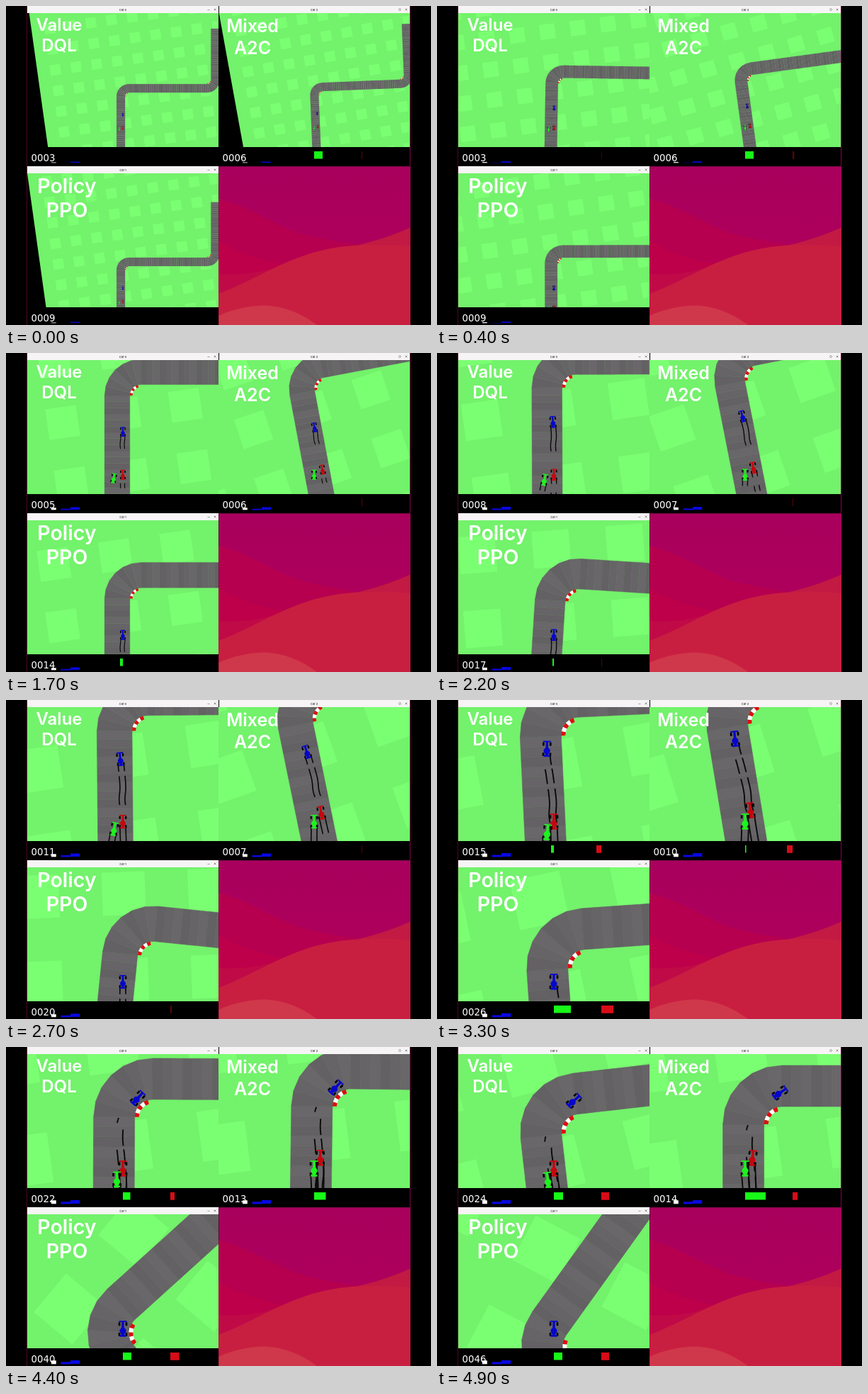
These frames come from a looping animation (600x450 px, 5 s). An HTML page:

```html
<!DOCTYPE html>
<html lang="en">
<head>
<meta charset="utf-8">
<title>Racing agents</title>
<style>
html, body { margin: 0; width: 100%; height: 100%; overflow: hidden; background: #000; }
svg { display: block; }
#stage { width: 600px; height: 450px; }
.label { font: 600 24px Inter, "Open Sans", sans-serif; fill: #fff; text-anchor: middle; }
.score { font: 13.3px "DejaVu Sans", sans-serif; fill: #fff; }
.title { font: 700 4px Inter, sans-serif; fill: #555; text-anchor: middle; }
.skid { fill: none; stroke: #0a0a0a; stroke-width: 1.9; }
</style>
</head>
<body>
<div id="root"></div>
<script>
const LOOP = 5000, STEP = 100;
const TIMES = [0, .9, 1.7, 2.7, 3.3, 3.9, 4.9];
const HALF = 29, TILE = 14.1;

// World positions on the track; turn is the rotation of the view that follows the car.
const CARS = {
  red: {
    color: '#c6060e',
    x: [14, 12, 13, 12.5, 13, 12.7, 12.7],
    y: [270, 253, 236, 204, 175, 151.5, 102],
    turn: [0, 1.6, 0, -.5, -2.7, 4.8, -6.5],
    skids: [[0, .6, 1.2], [0, 1.9, 5]]
  },
  green: {
    color: '#1cf41c',
    x: [-11, -10, -8, -2, 3, 5.5, 2.4],
    y: [277, 260, 244, 216, 189.5, 167, 117],
    turn: [-2.3, -13, -10.7, -11.6, -9.4, 0, 0],
    skids: [[0, 1.7, 5]]
  },
  blue: {
    color: '#0606cc',
    x: [14, 11.5, 13, 9.3, 8, 16.5, 51.3],
    y: [179, 159, 137.5, 101, 72, 46, 10],
    turn: [0, -.3, 0, 5.8, -4, -28.5, -54.3],
    skids: [[0, .5, 2.2], [0, 2.4, 2.9], [1, 3, 3.5], [-1, 3.65, 3.8]]
  }
};

const PANELS = [
  { car: 'red', title: 'Car 0', x: 30, y: 0, size: 24, words: [['Value', 75, 35], ['DQL', 75, 64]],
    score: [3, 2, 5, 11, 15, 19, 24], steer: [0, 0, 0, 0, -4, 8, 13], spin: [0, 1.5, 0, 0, -7, 1, 11] },
  { car: 'green', title: 'Car 2', x: 300, y: 0, size: 25, words: [['Mixed', 348, 36.5], ['A2C', 348, 67.5]],
    score: [6, 5, 6, 7, 10, 12, 14], steer: [12, 12, 0, 0, 1.5, 4, 29], spin: [1, 4, 1, 1, -8, -7, 7] },
  { car: 'blue', title: 'Car 1', x: 30, y: 226, size: 28.5, words: [['Policy', 86, 264], ['PPO', 86, 298]],
    score: [9, 8, 14, 20, 26, 33, 46], steer: [0, 0, -4, 0, 24, 12, 12], spin: [0, 0, 0, 2, 17, 14, 11] }
];
const SPEED_BAR = [.8, 1.8, 3, 4, 4.6, 5, 5];

const rad = a => a * Math.PI / 180;
const span = t => {
  let i = 0;
  while (i < TIMES.length - 2 && t > TIMES[i + 1]) i++;
  const h = TIMES[i + 1] - TIMES[i];
  return { i, h, u: Math.min(1, (t - TIMES[i]) / h) };
};

function linear(v, t) {
  const { i, u } = span(t);
  return v[i] + (v[i + 1] - v[i]) * u;
}

function smooth(v, t) {
  const { i, h, u } = span(t);
  const slope = k => {
    const a = Math.max(0, k - 1), b = Math.min(v.length - 1, k + 1);
    return (v[b] - v[a]) / (TIMES[b] - TIMES[a]);
  };
  const u2 = u * u, u3 = u2 * u;
  return (2 * u3 - 3 * u2 + 1) * v[i] + (u3 - 2 * u2 + u) * h * slope(i)
    + (3 * u2 - 2 * u3) * v[i + 1] + (u3 - u2) * h * slope(i + 1);
}

const pose = (car, t) => ({ x: smooth(car.x, t), y: smooth(car.y, t), turn: smooth(car.turn, t) });

const rect = (x, y, w, h, fill, extra = '') =>
  `<rect x="${x}" y="${y}" width="${w}" height="${h}" fill="${fill}" ${extra}/>`;
const poly = (points, fill, extra = '') =>
  `<polygon points="${points.map(p => p.map(n => n.toFixed(2)).join()).join(' ')}" fill="${fill}" ${extra}/>`;

function grass() {
  let d = '';
  for (let i = -2; i <= 9; i++)
    for (let j = -9; j <= 7; j++) d += `M${142 * i - 35.5} ${142 * j - 35.5}h71v71h-71z`;
  return `<g transform="translate(-125 116) rotate(-8)">${rect(-408, -1600, 3000, 3600, '#73f26b')}
    <path d="${d}" fill="#7bff72"/></g>`;
}

function track() {
  // Each leg: number of tiles and degrees turned per tile.
  const legs = [[42, 0], [6, 15], [38, 0], [6, -15], [25, 0]];
  const shades = ['#636163', '#666466', '#696769'];
  let x = 0, y = 54 + 42 * TILE, head = 0, n = 0, tiles = '', curbs = '';
  const side = (px, py, h, off) => [px + off * Math.cos(rad(h)), py + off * Math.sin(rad(h))];
  for (const [count, bend] of legs) {
    for (let k = 0; k < count; k++, n++) {
      const next = head + bend, mid = rad(head + bend / 2);
      const nx = x + TILE * Math.sin(mid), ny = y - TILE * Math.cos(mid);
      const strip = (a, b) => [side(x, y, head, a), side(x, y, head, b), side(nx, ny, next, b), side(nx, ny, next, a)];
      const shade = shades[n % 3];
      tiles += poly(strip(-HALF, HALF), shade, `stroke="${shade}" stroke-width=".6"`);
      if (bend && k < 5) {
        const s = Math.sign(bend);
        curbs += poly(strip(s * HALF, s * (HALF + 6)), k % 2 ? '#fff' : '#e00a14');
      }
      x = nx; y = ny; head = next;
    }
  }
  return tiles + curbs;
}

function carShape(color) {
  const wheels = [[-55, -80], [55, -80], [-55, 82], [55, 82]]
    .map(([x, y]) => rect(x - 15, y - 27, 30, 54, '#050505')).join('');
  return `<g transform="scale(.09)">${wheels}<path fill="${color}" d="M-60-130H60v20H18L20-20H25L50 10V40L20 90H50v30H-50V90H-20L-50 40V10L-25-20H-20L-18-110H-60z"/></g>`;
}

function world() {
  const names = Object.keys(CARS);
  const skids = names.map(n => `<path class="skid" id="skid-${n}"/>`).join('');
  const cars = ['red', 'green', 'blue'].map(n => `<g id="car-${n}">${carShape(CARS[n].color)}</g>`).join('');
  return `<g id="world">${grass()}${track()}${skids}${cars}</g>`;
}

function panel(p, k) {
  const { x, y } = p;
  const controls = k === 1
    ? `<circle cx="${x + 256}" cy="5" r="1.5" fill="none" stroke="#777" stroke-width=".6"/>`
    : `<path d="M${x + 254.5} ${y + 5.5}h3" stroke="#777" stroke-width=".7"/>`;
  return `${rect(x, y, 270, 226, '#000')}
    <svg x="${x}" y="${y + 10}" width="270" height="189" viewBox="${x} ${y + 10} 270 189" overflow="hidden">
      <use href="#world" id="view${k}"/></svg>
    ${rect(x + (k === 1 ? 1 : 0), y, k === 1 ? 269 : 270, 10, '#f6f4f5')}
    <text class="title" x="${x + 135}" y="${y + 6.6}">${p.title}</text>${controls}
    <path d="M${x + 263.7} ${y + 3.7}l2.6 2.6m0-2.6l-2.6 2.6" stroke="#666" stroke-width=".7"/>
    <text class="score" id="score${k}" x="${x + 5.5}" y="${y + 218.5}"></text>
    <path id="speed${k}" fill="#fff"/><path id="rear${k}" fill="#0808e0"/><path id="front${k}" fill="#0808e0"/>
    <path id="steer${k}" fill="#18f818"/><path id="spin${k}"/>
    ${p.words.map(([s, wx, wy]) => `<text class="label" style="font-size:${p.size}px" x="${wx}" y="${wy}">${s}</text>`).join('')}`;
}

function wallpaper() {
  return `<svg x="300.5" y="227" width="270.5" height="223" viewBox="300.5 227 270.5 223" overflow="hidden">
    <linearGradient id="dusk" x1="0" y1="0" x2="0" y2="1">
      <stop offset="0" stop-color="#a9005d"/><stop offset="1" stop-color="#b0005a"/></linearGradient>
    ${rect(300, 226, 272, 224, 'url(#dusk)')}
    <path d="M300 272C345 282 390 318 440 327Q470 333 497 337L470 450H300z" fill="#b6004f"/>
    <path d="M300 331Q330 352 392 364L370 450H300z" fill="#bd0049"/>
    <path d="M300 378Q350 381 388 366L370 450H300z" fill="#c00a47"/>
    <path d="M480 341Q530 331 572 312V450H480z" fill="#c21a43"/>
    <path d="M300 406C355 386 400 350 470 340Q520 334 572 339V450H300z" fill="#c81f41"/>
    <path d="M300 437Q330 423 366 422.500Q404 424 439 450H300z" fill="#cf384a"/></svg>`;
}

document.getElementById('root').innerHTML =
  `<svg id="stage" viewBox="0 0 600 450"><defs>${world()}</defs>${rect(0, 0, 600, 450, '#000')}
  ${wallpaper()}${PANELS.map(panel).join('')}
  ${rect(29, 0, 1, 450, '#4c0824')}${rect(570, 0, 1, 227, '#7a0845')}${rect(300, 226, 271, 1, '#7a0845')}</svg>`;

const el = id => document.getElementById(id);
const set = (id, name, value) => el(id).setAttribute(name, value);
const box = (x, y, w, h) => `M${x} ${y}h${w}v${h}h${-w}z`;

function skidPath(car, now) {
  let d = '';
  for (const [which, from, to] of car.skids) {
    const end = Math.min(to, now);
    if (end <= from) continue;
    for (const s of which ? [which] : [-1, 1]) {
      const steps = Math.ceil((end - from) / .1);
      for (let i = 0; i <= steps; i++) {
        const p = pose(car, from + (end - from) * i / steps), a = rad(-p.turn);
        const wx = p.x + s * 4.8 * Math.cos(a) - 8 * Math.sin(a);
        const wy = p.y + s * 4.8 * Math.sin(a) + 8 * Math.cos(a);
        d += `${i ? 'L' : 'M'}${wx.toFixed(2)} ${wy.toFixed(2)}`;
      }
    }
  }
  return d;
}

function drawHud(p, k, t) {
  const { x, y } = p, bar = linear(SPEED_BAR, t);
  const steer = linear(p.steer, t), spin = linear(p.spin, t);
  el('score' + k).textContent = String(Math.round(linear(p.score, t))).padStart(4, '0');
  set('speed' + k, 'd', box(x + 34, y + 221.3 - bar, 6.8, bar));
  const rear = Math.min(3.2, bar * .75 - .5), front = Math.min(5, bar + .5);
  set('rear' + k, 'd', rear > .3 ? box(x + 47.5, y + 221.5 - rear, 13.5, rear) : '');
  set('front' + k, 'd', box(x + 61, y + 221 - front, 13.3, front));
  set('steer' + k, 'd', Math.abs(steer) > .3 ? box(x + 135, y + 205, steer, 10.5) : '');
  set('spin' + k, 'd', Math.abs(spin) > .3 ? box(x + 202, y + 205, spin, 10.8) : '');
  set('spin' + k, 'fill', Math.abs(spin) < 2.5 ? '#5a0508' : '#d80c18');
}

function draw(ms) {
  const t = Math.floor(ms / STEP) * STEP / 1000;
  const zoom = Math.min(1, .207 + .2405 * t);
  for (const name in CARS) {
    const p = pose(CARS[name], t);
    set('car-' + name, 'transform', `translate(${p.x} ${p.y}) rotate(${-p.turn})`);
    set('skid-' + name, 'd', skidPath(CARS[name], t));
  }
  PANELS.forEach((p, k) => {
    const c = pose(CARS[p.car], t);
    set('view' + k, 'transform',
      `translate(${p.x + 135} ${p.y + 172}) rotate(${c.turn}) scale(${zoom}) translate(${-c.x} ${-c.y})`);
    drawHud(p, k, t);
  });
}

const start = performance.now();
function tick() {
  draw((performance.now() - start) % LOOP);
  requestAnimationFrame(tick);
}
tick();
</script>
</body>
</html>
```
